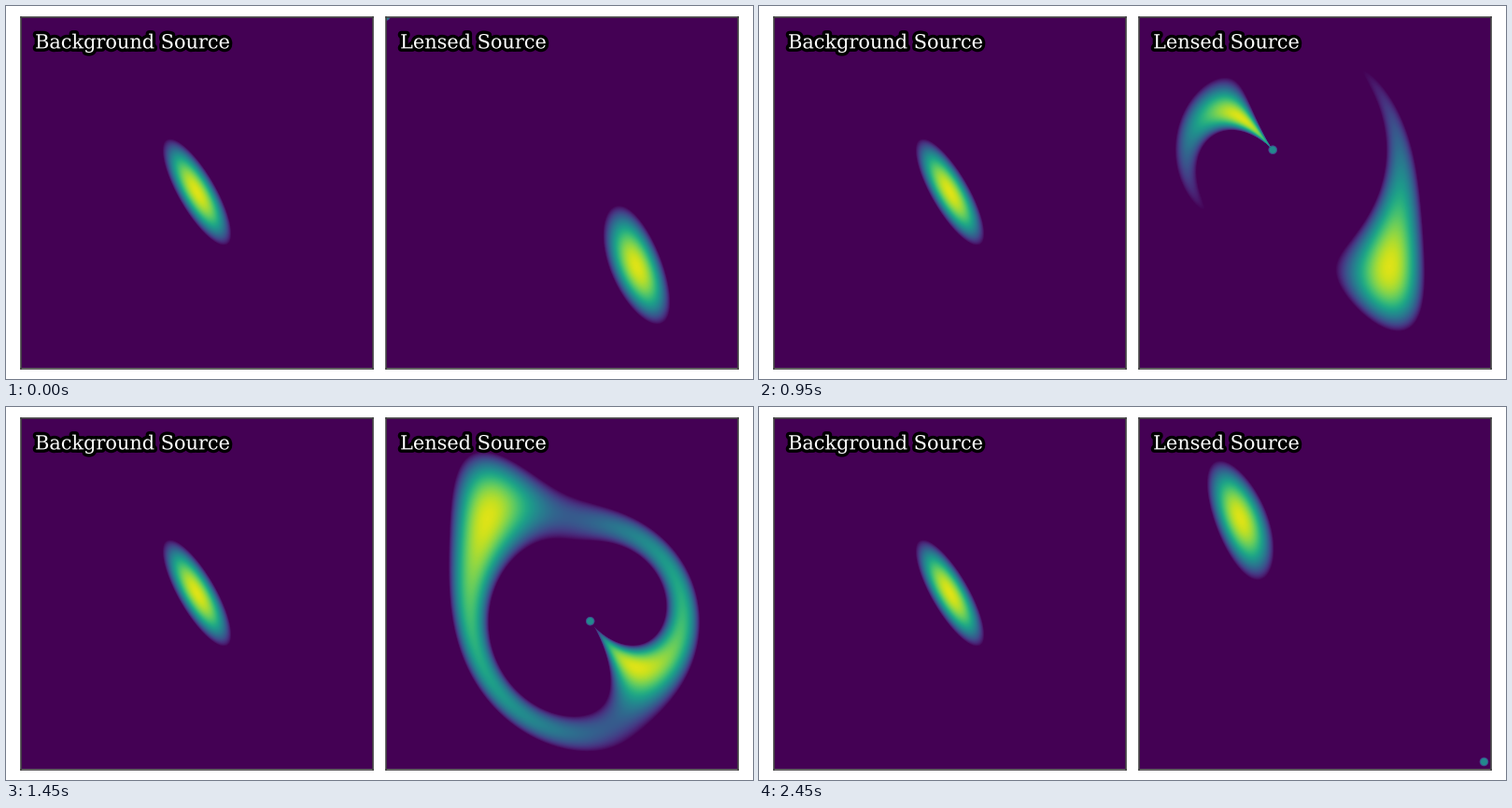
A matplotlib script for the animation above (2.5 s loop, 800x400 px).

```python
import numpy as np
import matplotlib.pyplot as plt
from matplotlib.animation import FuncAnimation
from matplotlib.patheffects import withStroke

W, H, DPI = 800, 400, 100
FRAMES, INTERVAL = 50, 50
SIDE = 377                      # panel size in pixels
EINSTEIN = 113.0                # Einstein radius in pixels
MAJOR, MINOR, TILT = 65.0, 20.2, np.pi / 3
PEAK = 0.95
DOT_RADIUS, DOT_LEVEL = 5.2, 0.47

axis = np.arange(SIDE) - (SIDE - 1) / 2
X, Y = np.meshgrid(axis, axis)


def source(x, y):
    """Brightness of a tilted elliptical source centred on the panel."""
    u = (x * np.cos(TILT) + y * np.sin(TILT)) / MAJOR
    v = (y * np.cos(TILT) - x * np.sin(TILT)) / MINOR
    return PEAK * np.clip(1 - u**2 - v**2, 0, 1)


def lensed(shift):
    """Source seen through an isothermal lens at (shift, shift)."""
    dx, dy = X - shift, Y - shift
    r = np.hypot(dx, dy) + 1e-6
    image = source(X - EINSTEIN * dx / r, Y - EINSTEIN * dy / r)
    dot = DOT_LEVEL * np.clip((DOT_RADIUS - r) / 2, 0, 1)
    return np.maximum(image, dot)


def panel(left, title, data):
    ax = fig.add_axes([left / W, 1 - (11.5 + SIDE) / H, SIDE / W, SIDE / H])
    ax.set(xticks=[], yticks=[])
    for spine in ax.spines.values():
        spine.set(color="#444444", linewidth=1.2)
    ax.text(0.04, 0.91, title, transform=ax.transAxes, color="white",
            family="DejaVu Serif", size=15,
            path_effects=[withStroke(linewidth=5, foreground="black")])
    return ax.imshow(data, cmap="viridis", vmin=0, vmax=1, aspect="auto")


def update(frame):
    picture.set_data(lensed((frame / FRAMES - 0.5) * SIDE))
    return [picture]


fig = plt.figure(figsize=(W / DPI, H / DPI), dpi=DPI, facecolor="white")
panel(16, "Background Source", source(X, Y))
picture = panel(407, "Lensed Source", lensed(-SIDE / 2))

anim = FuncAnimation(fig, update, frames=FRAMES, interval=INTERVAL,
                     repeat=True, repeat_delay=0, blit=False)
plt.show()
```
